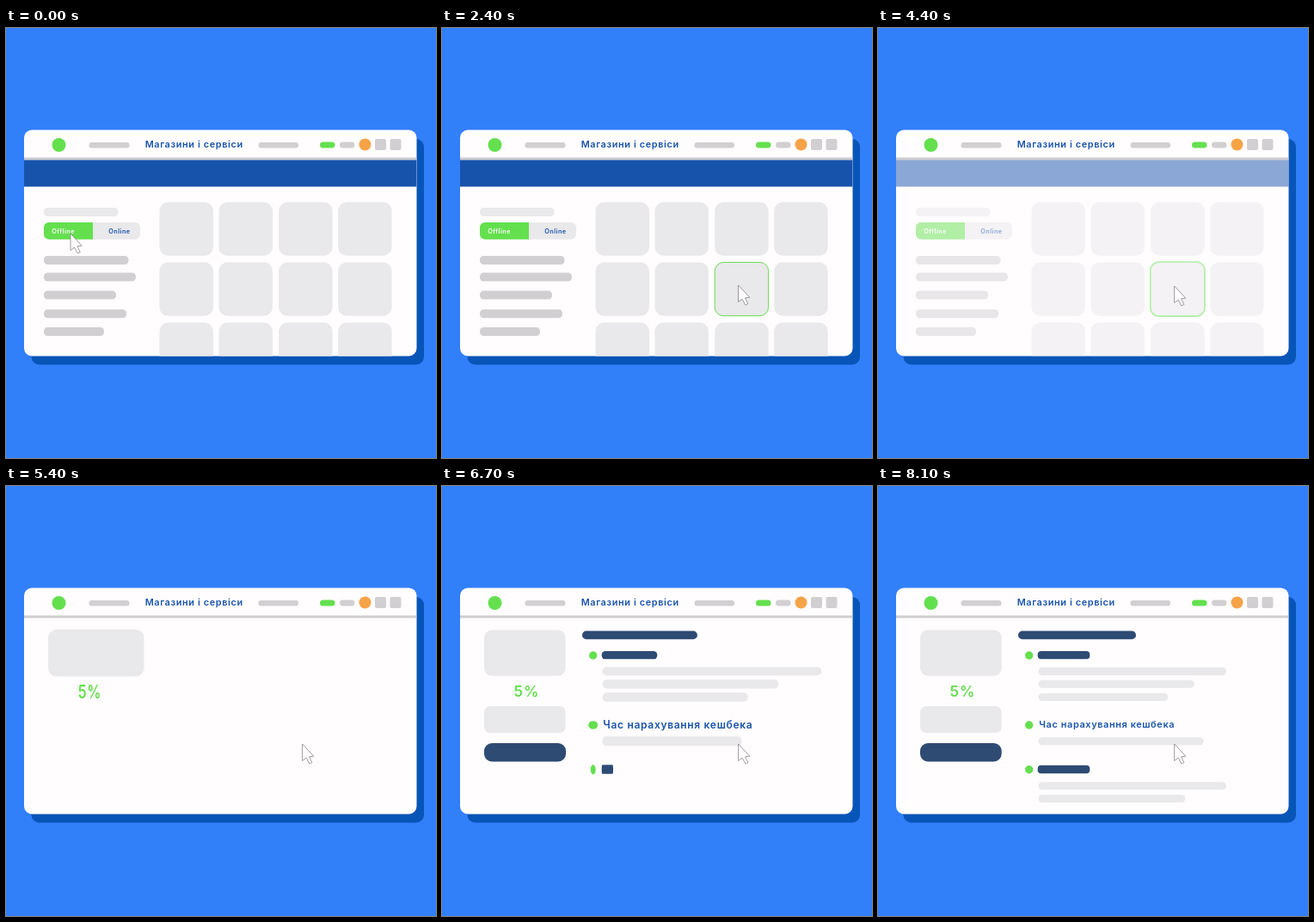
Animation of 500x500 px, one loop 10 s. Source, as an HTML page:

```html
<!DOCTYPE html>
<html lang="uk">
<head>
<meta charset="utf-8">
<title>Магазини і сервіси</title>
<style>
  html, body { margin: 0; width: 100%; height: 100%; overflow: hidden; background: #327ffa; }
  svg { display: block; width: 100%; height: 100%; }
  text { font-family: Inter, "Open Sans", sans-serif; font-weight: 600; }
</style>
</head>
<body>
<svg id="stage" viewBox="0 0 500 500">
  <defs><clipPath id="inside"><rect x="21" y="118.5" width="456.5" height="263" rx="9"/></clipPath></defs>
</svg>
<script>
const LOOP = 10000, STEP = 100;
const C = {
  white: '#fffdfe', blue: '#1853ab', navy: '#2d4b73', green: '#64e04e',
  light: '#e9e8ea', grey: '#d1cfd1', orange: '#f6a348', shadow: '#0855b8'
};
const stage = document.getElementById('stage');

function add(parent, tag, attrs, content) {
  const el = document.createElementNS('http://www.w3.org/2000/svg', tag);
  for (const k in attrs) el.setAttribute(k, attrs[k]);
  if (content) el.textContent = content;
  parent.appendChild(el);
  return el;
}
// Rounded box given by its edges
function box(parent, x1, y1, x2, y2, fill, rx = (y2 - y1) / 2) {
  return add(parent, 'rect', { x: x1, y: y1, width: x2 - x1, height: y2 - y1, rx, fill });
}
function label(parent, x, y, size, spacing, fill, str) {
  return add(parent, 'text', { x, y, fill, 'font-size': size, 'letter-spacing': spacing }, str);
}
const clamp = v => Math.max(0, Math.min(1, v));

// Window
box(stage, 29.5, 129, 486, 391.5, C.shadow, 9);
box(stage, 21, 118.5, 477.5, 381.5, C.white, 9);
const win = add(stage, 'g', { 'clip-path': 'url(#inside)' });

// Header
box(win, 21, 150.5, 477.5, 153.5, '#cfcdd0', 0);
add(win, 'circle', { cx: 61.5, cy: 136, r: 8, fill: C.green });
box(win, 96.5, 133, 143.5, 139.5, C.grey);
label(win, 161.7, 139.4, 10.9, 0.62, C.blue, 'Магазини і сервіси');
box(win, 293.5, 133, 340, 139.5, C.grey);
box(win, 365, 132.5, 382.5, 139.5, C.green);
box(win, 388, 132.5, 405.5, 139.5, C.grey);
add(win, 'circle', { cx: 417.5, cy: 135.5, r: 7, fill: C.orange });
box(win, 429, 129, 442, 142, C.grey, 2);
box(win, 446.5, 129, 459.5, 142, C.grey, 2);

// Catalogue page
const shop = add(win, 'g', {});
box(shop, 21, 153.5, 477.5, 184.5, C.blue, 0);
box(shop, 44, 209, 130.5, 219, C.light, 4.5);
box(shop, 44, 226, 156, 245.8, C.light, 6);
add(shop, 'path', { d: 'M101 226H50a6 6 0 0 0-6 6v7.8a6 6 0 0 0 6 6h51z', fill: C.green });
label(shop, 53.2, 238.7, 7.3, 0.45, C.white, 'Offline');
label(shop, 119.2, 238.7, 7.3, 0.45, C.blue, 'Online');
[[265, 142.5], [284.5, 151], [305.5, 128], [327.2, 140], [348, 114]]
  .forEach(([y, x2]) => box(shop, 44, y, x2, y + 10, C.grey, 4.5));

const cards = [];
for (const y of [202.5, 272.5, 342.5]) {
  for (const x of [178.5, 247.5, 317.2, 386.2]) {
    const g = add(shop, 'g', {});
    box(g, x, y, x + 62.4, y + 62.2, C.light, 10);
    const ring = box(g, x, y, x + 62.4, y + 62.2, 'none', 10);
    ring.setAttribute('stroke', C.green);
    cards.push({ g, ring, x, y });
  }
}
const chosen = cards[6];

// Details page: every part springs out at its own start time
const page = add(win, 'g', {});
const parts = [];
function pop(start, ax, ay, make) {
  const g = add(page, 'g', {});
  make(g);
  parts.push({ g, start, ax, ay });
}
function popBox(start, x1, y1, x2, y2, fill, rx) {
  pop(start, x1, (y1 + y2) / 2, g => box(g, x1, y1, x2, y2, fill, rx));
}
function popDot(start, y) {
  pop(start, 175.7, y, g => add(g, 'circle', { cx: 175.7, cy: y, r: 4.7, fill: C.green }));
}
popBox(5070, 49, 167.5, 143.7, 220.7, C.light, 9);
pop(5200, 84, 239, g => label(g, 83.6, 245.2, 17.3, 0.9, C.green, '5%'));
popBox(5400, 49, 256, 143.7, 287, C.light, 7);
popBox(5620, 49, 299, 143.7, 320.4, C.navy, 9);
popBox(5960, 163, 168.5, 300, 178.3, C.navy);
popDot(6150, 197);
popBox(6230, 185.7, 192, 246.3, 201.3, C.navy, 4);
popBox(6400, 186.5, 211, 405, 220, C.light);
popBox(6430, 186.5, 225.8, 367.7, 234.8, C.light);
popBox(6435, 186.5, 241, 337.3, 250, C.light);
popDot(6370, 278);
pop(6445, 187.5, 277.5, g => label(g, 187.3, 281.4, 10.9, 0.62, C.blue, 'Час нарахування кешбека'));
popBox(6520, 186.5, 292.2, 378.5, 301.2, C.light);
popDot(6560, 329.7);
popBox(6630, 185.7, 324.8, 246.3, 334.2, C.navy, 4);
popBox(6850, 186.5, 344.2, 405, 353.2, C.light);
popBox(6950, 186.5, 359, 357, 368, C.light);

const cursor = add(stage, 'path', {
  d: 'M0 0V19.5L4.6 16.2L8.2 23L11.2 21.6L8 14.8L13.2 14.2Z',
  fill: C.white, stroke: '#77757a', 'stroke-width': 0.7, 'stroke-linejoin': 'round'
});

function cursorAt(t) {
  const s = 0.5 - 0.5 * Math.cos(Math.PI * clamp((t - 400) / 2100));
  const mix = (a, b, c) => (1 - s) ** 2 * a + 2 * s * (1 - s) * b + s * s * c;
  return [mix(75, 339, 344.6), mix(239, 215, 300)];
}

// Times at which the cursor enters and leaves each card
for (const c of cards) {
  for (let t = 0; t <= 3000; t += 5) {
    const [x, y] = cursorAt(t);
    const over = x > c.x && x < c.x + 62.4 && y > c.y && y < c.y + 62.2;
    if (over && c.enter === undefined) c.enter = t;
    if (over) c.leave = t;
  }
}

function hover(c, t) {
  if (c.enter === undefined) return 0;
  const fade = c === chosen ? 0 : clamp((t - c.leave) / 220);
  return clamp((t - c.enter) / 70) * (1 - fade);
}

function spring(ms) {
  const s = ms / 1000, a = 5.25, w = Math.PI / 0.33;
  return 1 - Math.exp(-a * s) * (Math.cos(w * s) + a / w * Math.sin(w * s));
}
const stretch = ms => ms < 345 ? 1 + 0.23 * Math.sin(Math.PI * ms / 345) : 1;

function scaleAt(g, x, y, sx, sy) {
  g.setAttribute('transform', `translate(${x} ${y}) scale(${sx} ${sy}) translate(${-x} ${-y})`);
}

function draw(t) {
  const [cx, cy] = cursorAt(t);
  cursor.setAttribute('transform', `translate(${cx} ${cy})`);

  shop.setAttribute('opacity', 1 - clamp((t - 4100) / 600));
  for (const c of cards) {
    c.ring.setAttribute('stroke-opacity', hover(c, t));
    c.ring.setAttribute('stroke-width', c === chosen ? 1 + 0.6 * clamp((t - 2500) / 500) : 1);
  }
  const down = clamp((t - 3100) / 400), up = clamp((t - 3500) / 500);
  const press = Math.sin(Math.PI / 2 * down) * (0.5 + 0.5 * Math.cos(Math.PI * up));
  const size = 1 + 0.015 * up - 0.06 * press;
  scaleAt(chosen.g, chosen.x + 31.2, chosen.y + 31.1, size, size);

  for (const p of parts) {
    const ms = t - p.start;
    p.g.setAttribute('display', ms > 0 ? 'inline' : 'none');
    if (ms > 0) scaleAt(p.g, p.ax, p.ay, spring(ms), stretch(ms));
  }
}

const begin = performance.now();
function tick() {
  const t = (performance.now() - begin) % LOOP;
  draw(Math.floor(t / STEP) * STEP);
  requestAnimationFrame(tick);
}
tick();
</script>
</body>
</html>
```
